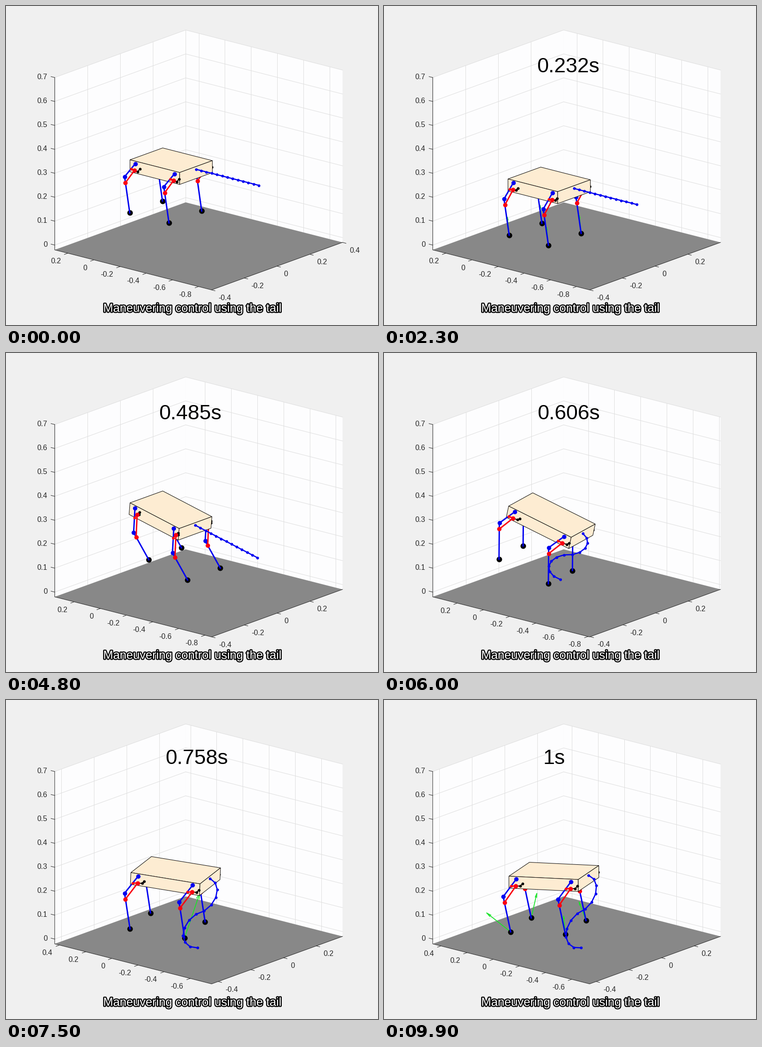
A matplotlib script for the animation above (10000 ms loop, 808 by 693 pixels).

```python
import numpy as np
import matplotlib.pyplot as plt
from matplotlib.animation import FuncAnimation
from matplotlib.patheffects import withStroke

W, H, DPI = 808, 693, 64
PT = 72 / DPI          # points per pixel
N = 100
FONT = "Liberation Sans"
BLUE, RED, GREEN, BLACK = "#0000f0", "#fa0010", "#18e428", "#000000"
INK, GRID, SKIN = "#262626", "#dedede", "#fdecd2"
THIGH, SHANK, SEG = 0.104, 0.151, 0.04
X0, X1, Y0, Y1, Z0, Z1 = -.9, .3, -.4, .4, -.02, .7

fig = plt.figure(figsize=(W / DPI, H / DPI), dpi=DPI, facecolor="#f0f0f0")
ax = fig.add_axes([0, 0, 1, 1])
ax.set_xlim(-0.5, W - 0.5)
ax.set_ylim(H - 0.5, -0.5)
ax.axis("off")

# ---- motion, sampled once per frame ----
n = np.arange(N)
G = 9.81 / 2 / 99 ** 2
TOUCH, PUSH, LEAVE, APEX, LAND = 12.6, 33, 41, 52.6, 64.5
REST, TOP = .2046, .2973


def ease(a, b):
    u = np.clip((n - a) / (b - a), 0, 1)
    return u * u * (3 - 2 * u)


def spring(t0, offset, speed, omega, tau):
    """Damped bounce that starts at t0."""
    t = np.maximum(n - t0, 0)
    return np.exp(-t / tau) * (offset * np.cos(omega * t)
                               + (speed + offset / tau) / omega * np.sin(omega * t))


flight = TOP - G * (n - APEX) ** 2
drop = .2846 - G * n ** 2
stand = (REST + spring(TOUCH, 0, -2 * G * TOUCH, .3, 3)
         + .0255 * (np.maximum(n - PUSH, 0) / (LEAVE - PUSH)) ** 3)
fall = LAND - APEX
settle = REST + spring(LAND, TOP - G * fall ** 2 - REST, -2 * G * fall, .55, 12)
height = np.select([n < TOUCH, n <= LEAVE, n <= LAND], [drop, stand, flight], settle)

pos_x = .00325 * np.clip(n - PUSH, 0, 50)
pos_y = -.0005 * ((n > 14) & (n < 50)) - .04 * ease(57, 74)
pitch = np.radians(16.6 * ease(34, 62) - 18.7 * ease(64, 83) + 2.1 * ease(83, 95))
yaw = np.radians(22 * ease(48, 66))
roll = np.radians(3 * ease(62, 75) - 2.5 * ease(75, 85))
curl = np.radians(24.5 * ease(48, 62))
droop = np.radians(42 * ease(48, 86))

# the feet reach for the ground, as far as the legs are stretched
reach = (.0417 - .011 * ease(0, 11) - .136 * ease(37, 48) + .197 * ease(49, 60)
         - .0705 * ease(62, 83) + .009 * ease(84, 95))
stretch = (.211 + .0117 * ease(0, 11) + .03 * ease(30, 40) - .052 * ease(40, 47)
           + .0205 * ease(57, 70))
depth = np.minimum(height + .018, stretch)
span = np.hypot(reach, depth)
bend = np.arccos(np.clip((THIGH ** 2 + span ** 2 - SHANK ** 2) / (2 * THIGH * span), -1, 1))
thigh = np.arctan2(reach, depth) + bend
shank = np.arctan2(reach - THIGH * np.sin(thigh), depth - THIGH * np.cos(thigh))


# ---- drawing helpers ----
def proj(p):
    """World point relative to the tracked body origin -> pixels."""
    x, y, z = np.asarray(p, float).T
    return np.column_stack([332.7 - 284 * x + 355.5 * y,
                            489 - 72.5 * x - 129 * y - 520 * z])


def put(px, color, lw=1.0, ms=0, z=5):
    px = np.asarray(px)
    return ax.plot(px[:, 0], px[:, 1], color=color, lw=lw * PT, marker="o" if ms else None,
                   ms=ms * PT, mew=0, zorder=z)[0]


def face(px, fill, edge="none", z=5):
    return ax.fill(*np.asarray(px).T, fc=fill, ec=edge, lw=PT, zorder=z)[0]


def label(x, y, s, size=16, color=INK, ha="center", z=5):
    return ax.text(x, y, s, fontname=FONT, fontsize=size * PT, color=color,
                   ha=ha, va="baseline", zorder=z)


def build_stage():
    left = [(X1, Y0, Z0), (X1, Y1, Z0), (X1, Y1, Z1), (X1, Y0, Z1)]
    right = [(X0, Y1, Z0), (X1, Y1, Z0), (X1, Y1, Z1), (X0, Y1, Z1)]
    for wall in (left, right):
        face(proj(wall), "#fdfdfe", z=1)
    for k in range(8):
        z = k / 10
        put(proj([(X1, Y0, z), (X1, Y1, z), (X0, Y1, z)]), GRID, z=2)
        x, y = proj([(X1, Y0, z)])[0]
        put([(x, y), (x - 8, y - 2)], INK, z=4)
        label(x - 16, y + 4, f"{z:g}", ha="right")
    face(proj([(X1, Y0, Z0), (X0, Y0, Z0), (X0, Y1, Z0), (X1, Y1, Z0)]), "#888888", z=3)
    put(proj([(X1, Y0, Z1), (X1, Y0, Z0), (X0, Y0, Z0), (X0, Y1, Z0)]), INK, z=4)
    cap = label(404, 664, "Maneuvering control using the tail", 25.9, "white", z=9)
    cap.set_path_effects([withStroke(linewidth=4.6 * PT, foreground="black")])


def draw_ticks(bx, by):
    out = []

    def tick(wall, foot, dx, dy, ha, value):
        px, py = proj([foot])[0]
        out.extend([put(proj(wall), GRID, z=2),
                    put([(px, py), (px + dx, py + dy)], INK, z=4),
                    label(px + 2 * dx, py + 22, f"{value:g}", ha=ha)])

    for k in range(-6, 4):
        v = round(.2 * k, 1)
        x, y = v - bx, v - by
        if X0 - 1e-6 <= x <= X1 + 1e-6:
            tick([(x, Y1, Z0), (x, Y1, Z1)], (x, Y0, Z0), -7.5, 2.7, "right", v)
        if Y0 - 1e-6 <= y <= Y1 + 1e-6:
            tick([(X1, y, Z0), (X1, y, Z1)], (X0, y, Z0), 7.5, 2, "left", v)
    return out


def leg_points(i, hip, fwd, up):
    head = np.array([np.cos(yaw[i]), -np.sin(yaw[i]), 0])
    down = np.array([0, 0, -1])

    def arm(a, r):
        return r * (np.sin(a) * head + np.cos(a) * down)

    a, b = thigh[i], shank[i]
    knee = hip + arm(a, THIGH)
    pts = dict(hip=hip, knee=knee, foot=knee + arm(b, SHANK), rod=knee + arm(b, .025),
               pin=hip + arm(a, .041), crank=hip + arm(a - np.radians(40), .029),
               motor=hip + arm(.75 * a - np.radians(72), .036),
               mount=hip - .035 * fwd - .017 * up)
    return {k: proj([p])[0] for k, p in pts.items()}


def draw_leg(p):
    return [put([p["crank"], p["motor"], p["mount"]], BLACK, 2),
            put([p["motor"], p["mount"]], BLACK, 0, 6),
            put([p["foot"]], BLACK, 0, 12),
            put([p["hip"], p["knee"], p["foot"]], BLUE, 3),
            put([p["hip"], p["knee"]], BLUE, 0, 9.5),
            put([p["pin"], p["crank"], p["rod"]], RED, 3),
            put([p["pin"]], RED, 0, 6),
            put([p["crank"], p["rod"]], RED, 0, 9.5)]


def forces(i):
    """Ground force in pixels per loaded leg: 0, 1 near and 2, 3 far."""
    if TOUCH < i <= LEAVE:
        return dict.fromkeys(range(4), (-4, -39))
    if i < LAND:
        return {}
    if i < 80:
        return {1: (34, -100)}
    if i < 90:
        return {2: (56, -139)}
    return {0: (-52, -41), 1: (-4, -40), 2: (12, -53), 3: (-15, -40)}


def draw_force(foot, vec):
    v = np.array(vec, float)
    tip, side = foot + v, np.array([-v[1], v[0]])
    back = tip - .15 * v
    return [put([foot, tip], GREEN, 1.8),
            put([back + .03 * side, tip, back - .03 * side], GREEN, 1.5)]


def tail_points(i, root, fwd, left, up):
    """Every joint turns by the same angle: six one way, six back."""
    k = np.arange(1, 13)
    a = np.minimum(k, 12 - k)[:, None] * curl[i]
    side = -left * np.cos(droop[i]) - up * np.sin(droop[i])
    steps = SEG * (-fwd * np.cos(a) + side * np.sin(a))
    return proj(root + np.vstack([np.zeros(3), np.cumsum(steps, axis=0)]))


live = []


def draw(i):
    while live:
        live.pop().remove()
    live.extend(draw_ticks(pos_x[i], pos_y[i]))

    cp, sp, cy, sy = np.cos(pitch[i]), np.sin(pitch[i]), np.cos(yaw[i]), np.sin(yaw[i])
    fwd = np.array([cp * cy, -cp * sy, sp])
    left = np.array([sy * np.cos(roll[i]), cy * np.cos(roll[i]), np.sin(roll[i])])
    up = np.cross(fwd, left)
    mid = np.array([0, 0, height[i] + .03]) - .09 * fwd - .03 * up

    def at(f, l, u):
        return mid + f * fwd + l * left + u * up

    legs = [leg_points(i, at(f, l, .014), fwd, up)
            for l in (-.1, .1) for f in (.15, -.15)]
    for k, vec in forces(i).items():
        live.extend(draw_force(legs[k]["foot"], vec))
    for leg in legs[2:]:
        live.extend(draw_leg(leg))

    a, b, c = .19, .1, .025
    top = [(a, -b, c), (a, b, c), (-a, b, c), (-a, -b, c)]
    near = [(a, -b, c), (-a, -b, c), (-a, -b, -c), (a, -b, -c)]
    rear = [(-a, -b, c), (-a, b, c), (-a, b, -c), (-a, -b, -c)]
    for side in (top, near, rear):
        live.append(face(proj([at(*p) for p in side]), SKIN, "black"))

    for leg in legs[:2]:
        live.extend(draw_leg(leg))
    live.append(put(tail_points(i, at(-.19, 0, .0135), fwd, left, up), BLUE, 2.6, 6))

    if i:
        x, y = proj([(0, -pos_y[i], Z1)])[0]
        live.append(label(x - 1.5, y + 19, f"{round(i / 99, 3):g}s", 45.3, "black", "left"))
    return live


build_stage()
anim = FuncAnimation(fig, draw, frames=N, interval=100, repeat=True, repeat_delay=0)
plt.show()
```
